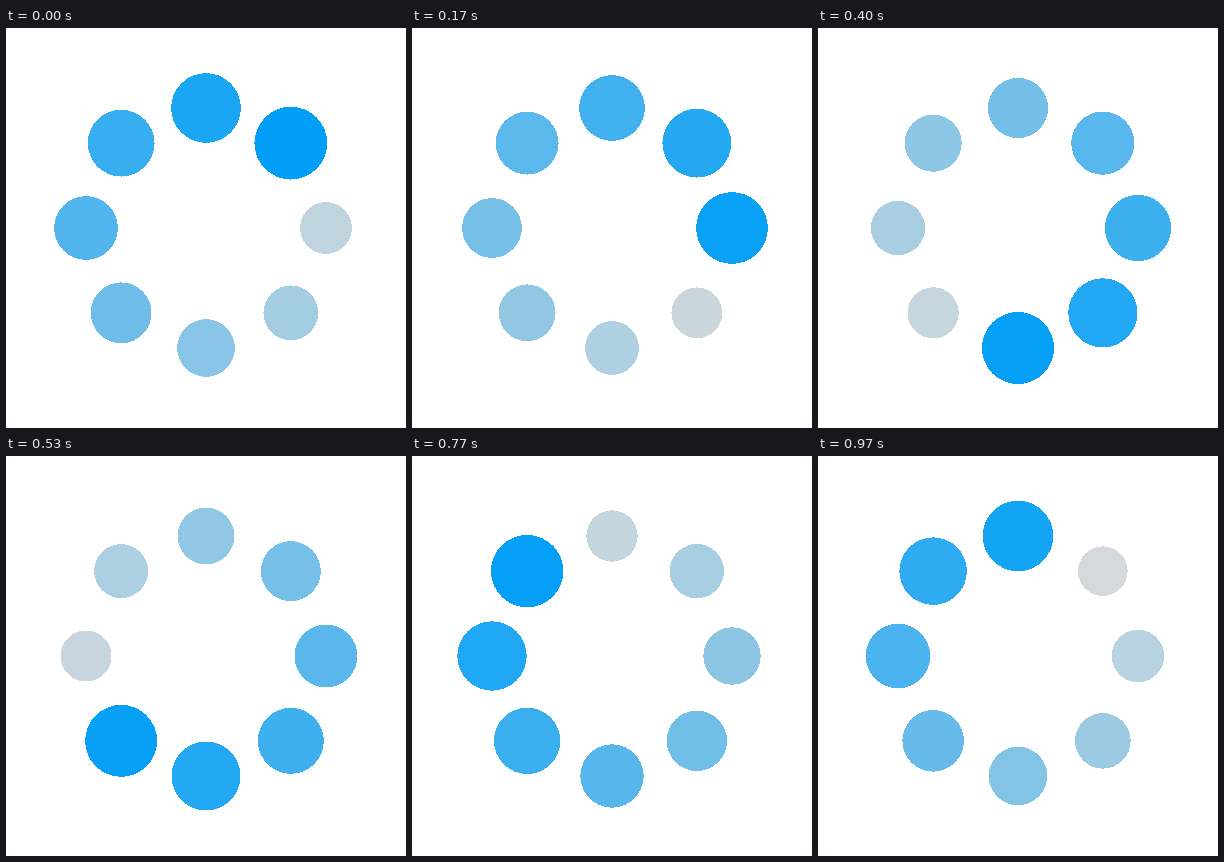
Animation, 400 px wide and 400 px high, one loop 1000 ms. Source, as an HTML page:

```html
<!DOCTYPE html>
<html lang="en">
<head>
<meta charset="utf-8">
<title>Loading spinner</title>
<style>
  html, body { margin: 0; width: 100%; height: 100%; overflow: hidden; background: #fff; }
  svg { display: block; width: 100%; height: 100%; }
</style>
</head>
<body>
<svg id="stage" viewBox="0 0 400 400" shape-rendering="crispEdges"></svg>
<script>
const COUNT = 8, LOOP = 1000, FPS = 30;
const CENTER = 200, ORBIT = 120;
const BIG = 36.4, SMALL = 24.4;
const BRIGHT = [0, 158, 247], PALE = [219, 220, 219];

const stage = document.getElementById('stage');
const mix = (a, b, p) => a + (b - a) * p;

const dots = Array.from({ length: COUNT }, (_, i) => {
  const angle = (i - 1) * Math.PI / 4;
  const dot = document.createElementNS('http://www.w3.org/2000/svg', 'circle');
  dot.setAttribute('cx', CENTER + ORBIT * Math.cos(angle));
  dot.setAttribute('cy', CENTER + ORBIT * Math.sin(angle));
  stage.appendChild(dot);
  return dot;
});

// 30 steps per loop, each starting on a multiple of 10 ms
function stepAt(ms) {
  const tick = Math.floor((ms % LOOP) / 10);
  return Math.floor((tick * 3 + 1) / 10);
}

function render(ms) {
  const time = stepAt(ms) / FPS;
  dots.forEach((dot, i) => {
    const phase = (time - i / COUNT + 1) % 1;
    const rgb = BRIGHT.map((c, k) => Math.round(mix(c, PALE[k], phase)));
    dot.setAttribute('r', mix(BIG, SMALL, phase));
    dot.setAttribute('fill', `rgb(${rgb})`);
  });
}

function loop() {
  render(performance.now());
  requestAnimationFrame(loop);
}
loop();
</script>
</body>
</html>
```
